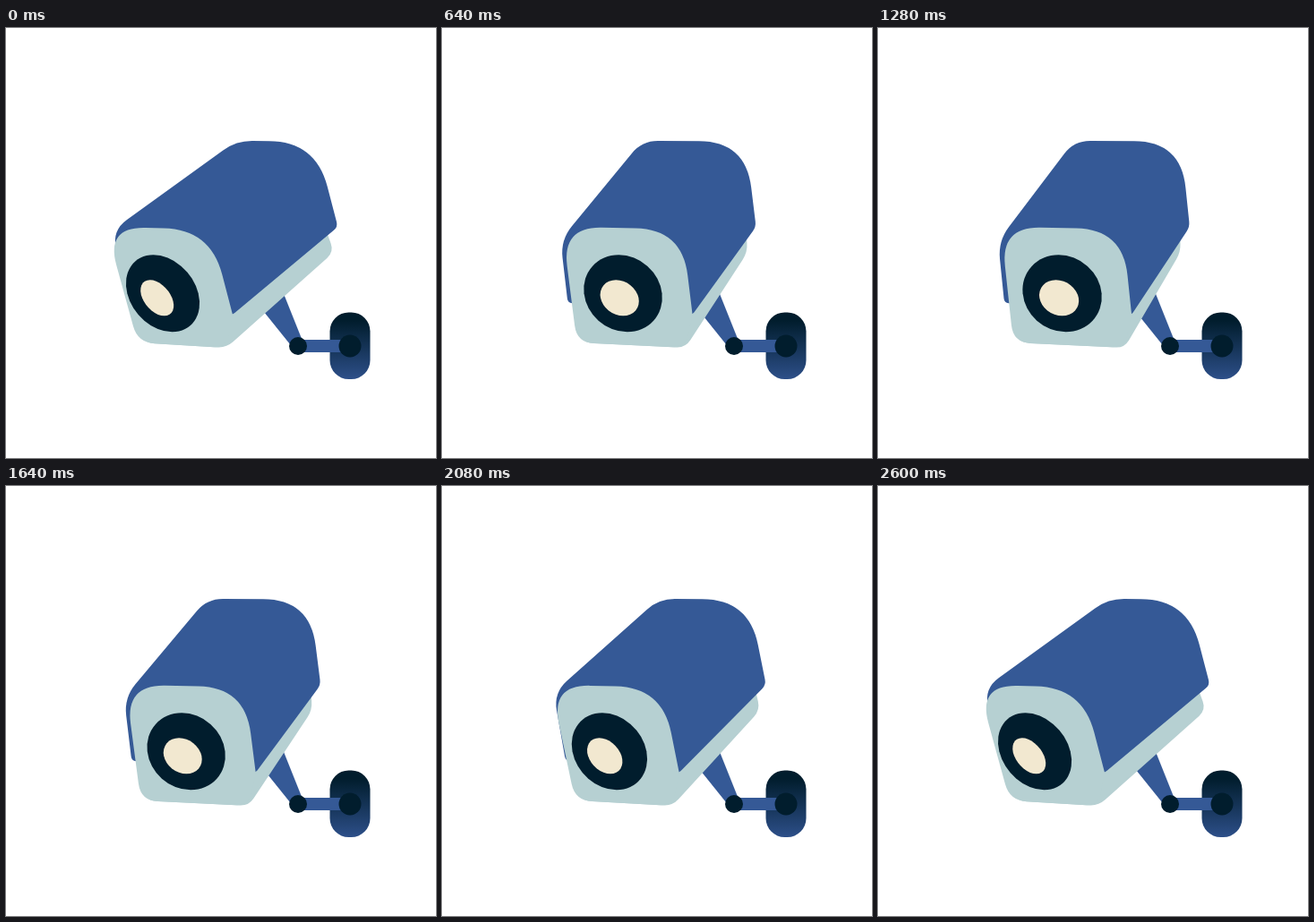
Animation of 480x480 px, one loop 3320 ms. Source, as an HTML page with a canvas:

```html
<!DOCTYPE html>
<html lang="en">
<head>
<meta charset="utf-8">
<title>Security camera</title>
<style>
html, body { margin: 0; width: 100%; height: 100%; overflow: hidden; background: #fff; }
canvas { display: block; width: 480px; height: 480px; }
</style>
</head>
<body>
<canvas id="stage" width="480" height="480"></canvas>
<script>
const ctx = document.getElementById('stage').getContext('2d');
const LOOP = 3320, STEP = 40;
const BLUE = '#355996', DARK = '#011d2d', PALE = '#b6d0d2', CREAM = '#f2e8d0';

const mix = (a, b, u) => a + (b - a) * u;

// Cubic ease with handles (x1, 0) and (x2, 1).
function ease(x, x1, x2) {
  if (x <= 0) return 0;
  if (x >= 1) return 1;
  let lo = 0, hi = 1;
  for (let i = 0; i < 24; i++) {
    const s = (lo + hi) / 2, r = 1 - s;
    if (3 * r * r * s * x1 + 3 * r * s * s * x2 + s * s * s < x) lo = s;
    else hi = s;
  }
  return lo * lo * (3 - 2 * lo);
}

// 0 is turned left, about 1 is turned right.
function turn(t) {
  const out = ease(t / 960, 0.45, 0.37);
  const back = ease((t - 1080) / 1560, 0.6, 0.62);
  return 1.02 * (out - back);
}

// The point at distance d from p towards q.
function toward(p, q, d) {
  const k = d / Math.hypot(q.x - p.x, q.y - p.y);
  return [mix(p.x, q.x, k), mix(p.y, q.y, k)];
}

// Polygon whose corners are rounded over the length r on both sides.
function fillRounded(corners, color) {
  const n = corners.length;
  ctx.beginPath();
  corners.forEach((p, i) => {
    ctx.lineTo(...toward(p, corners[(i + n - 1) % n], p.r));
    ctx.quadraticCurveTo(p.x, p.y, ...toward(p, corners[(i + 1) % n], p.r));
  });
  ctx.closePath();
  ctx.fillStyle = color;
  ctx.fill();
}

function disc(x, y, r, color) {
  ctx.beginPath();
  ctx.arc(x, y, r, 0, Math.PI * 2);
  ctx.fillStyle = color;
  ctx.fill();
}

// Ellipse leaning sideways by the given shear.
function leaningDisc(x, y, width, height, shear, color) {
  ctx.save();
  ctx.transform(width, 0, shear, height, x, y);
  disc(0, 0, 1, color);
  ctx.restore();
}

const shade = ctx.createLinearGradient(0, 318, 0, 392);
shade.addColorStop(0.12, DARK);
shade.addColorStop(1, '#2d4f89');

function drawMount() {
  ctx.beginPath();
  ctx.roundRect(361.5, 317.5, 45, 74.5, 21);
  ctx.fillStyle = shade;
  ctx.fill();
  ctx.fillStyle = BLUE;
  ctx.fillRect(326, 348, 58, 14);
  ctx.beginPath();
  ctx.moveTo(276, 302);
  ctx.lineTo(304.5, 283);
  ctx.lineTo(332.5, 353);
  ctx.lineTo(321, 358);
  ctx.fill();
  disc(326, 355, 10, DARK);
  disc(384, 355, 12.5, DARK);
}

function drawCamera(u) {
  const at = (x0, x1, y0, r, y1 = y0) => ({ x: mix(x0, x1, u), y: mix(y0, y1, u), r });
  const depth = mix(117.5, 65, u);
  const behind = (p, r) => ({ x: p.x + depth, y: p.y - 98, r });

  // Front face
  const topLeft = at(111.5, 137, 222, 44);
  const topRight = at(228, 273, 224.5, 52);
  const tip = at(253, 283, 320, 3);
  const bottomRight = at(246, 275, 357, 10);
  const bottomLeft = at(147, 151, 351, 19);

  const body = [
    at(200, 220, 260, 0), at(357, 337, 225, 0), at(366, 338, 250, 10),
    bottomRight, bottomLeft
  ];
  const cover = [
    at(118.5, 134, 226, 20, 238), at(257, 219, 126, 18),
    behind(topRight, 52), behind(tip, 6), tip,
    at(160, 160, 308, 0), at(136, 141, 307, 5)
  ];
  fillRounded(body, PALE);
  fillRounded(cover, BLUE);
  fillRounded([topLeft, topRight, { ...tip, r: 0 }, { ...bottomRight, r: 14 }, bottomLeft], PALE);

  leaningDisc(mix(175, 205.5, u), 296.3, mix(39.7, 44, u), 43, mix(10.5, 4, u), DARK);
  leaningDisc(mix(168.7, 202, u), 301.3, mix(16.7, 21.8, u), 20, mix(8, 3.5, u), CREAM);
}

function draw(t) {
  ctx.fillStyle = '#fff';
  ctx.fillRect(0, 0, 480, 480);
  drawMount();
  drawCamera(turn(t));
}

const start = performance.now();
function tick() {
  const t = (performance.now() - start) % LOOP;
  draw(Math.floor(t / STEP) * STEP);
  requestAnimationFrame(tick);
}
tick();
</script>
</body>
</html>
```
